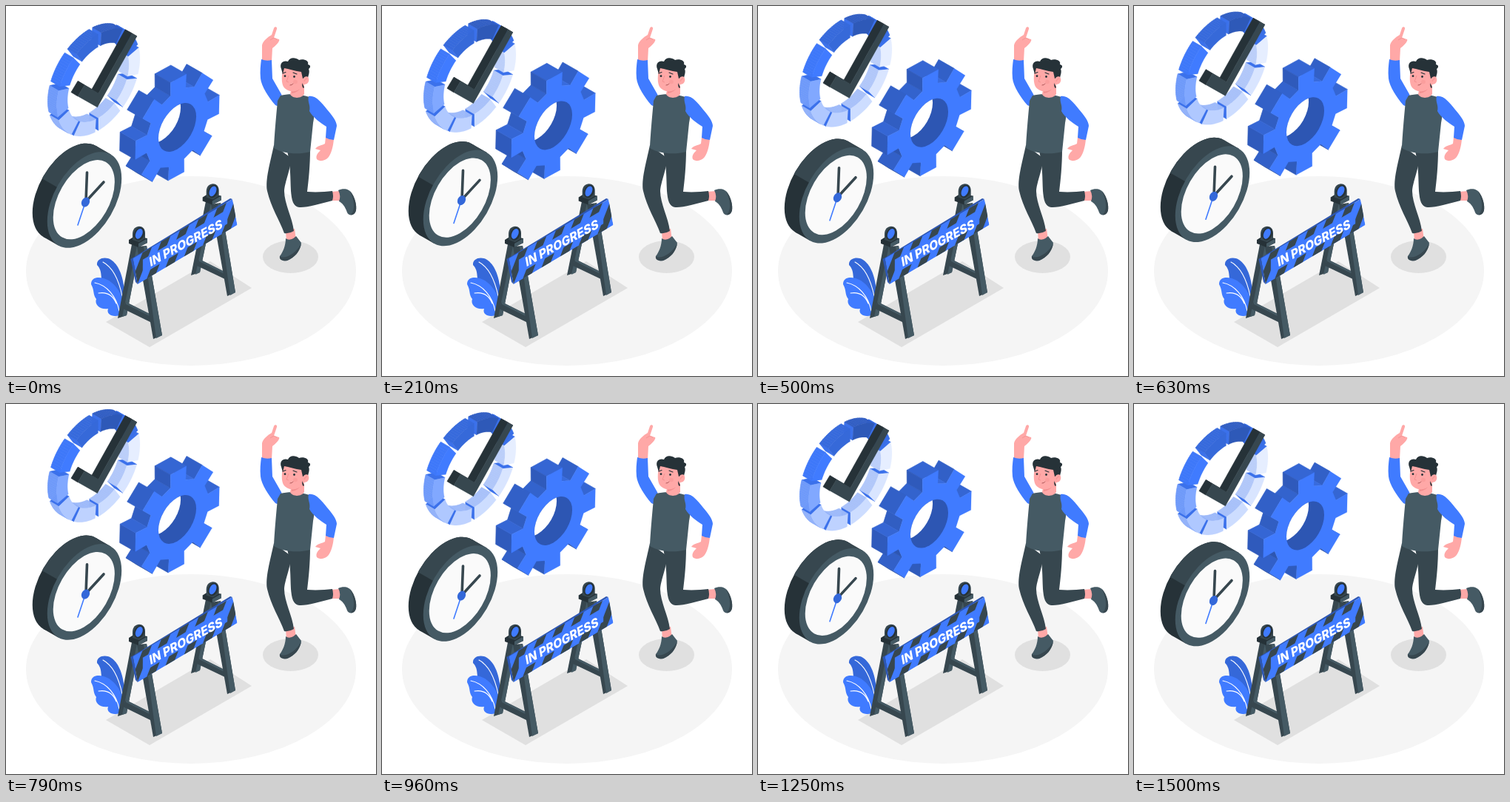
An HTML page for the animation above (1540 ms loop, 500 px wide and 500 px high).

```html
<!DOCTYPE html>
<html lang="en">
<head>
<meta charset="utf-8">
<title>In progress</title>
<style>
  html, body { margin: 0; width: 100%; height: 100%; overflow: hidden; background: #fff; }
  svg { display: block; width: 100vw; height: 100vh; }
  text { font: 800 17px Inter, Roboto, sans-serif; fill: #fff; text-anchor: middle; }
</style>
</head>
<body>
<svg viewBox="0 0 500 500">
  <defs>
    <clipPath id="hole"><circle r="29.5" transform="matrix(.866 -.5 0 1 231.5 164)"/></clipPath>
    <clipPath id="lit"><path d="M20 216.6L90 256.9L180 300V150H20Z"/></clipPath>
    <clipPath id="board"><path d="M0 0H160V36H0Z"/></clipPath>
  </defs>

  <ellipse cx="250" cy="358" rx="223" ry="128" fill="#f5f5f5"/>
  <path d="M135 427L276 345L332 381L194 461Z" fill="#e0e0e0"/>
  <ellipse cx="384.5" cy="339" rx="37.5" ry="22" fill="#e0e0e0"/>

  <g id="ring"></g>
  <g id="gear"></g>

  <g id="clock">
    <g id="case"></g>
    <circle r="58" transform="matrix(.866 -.5 0 1 106 262)" fill="#455a64"/>
    <circle r="48" transform="matrix(.866 -.5 0 1 105.3 261.7)" fill="#fafafa"/>
    <g fill="none" stroke-linecap="round">
      <path d="M108 264L109.5 225M109 263L132 238" stroke="#37474f" stroke-width="3.6"/>
      <path d="M107 266L97 296" stroke="#407bff" stroke-width="1.6"/>
    </g>
    <ellipse cx="107.5" cy="265" rx="5.3" ry="6.8" transform="rotate(28 107.5 265)" fill="#3468d9"/>
  </g>

  <!-- plant -->
  <path d="M123 350C122 341 134 338 142 343C151 349 158 362 160 385L154 400C147 386 140 378 131 373C127 368 131 358 123 350Z" fill="#3568d9"/>
  <path d="M115 376C115 366 125 366 132 368C146 372 156 387 160 402L153 418C145 421 135 417 138 409C128 411 119 404 122 396C117 390 120 385 115 376Z" fill="#407bff"/>
  <path d="M131 346C144 353 152 368 157 392M120 374C136 377 149 392 153 412M125 388C137 386 145 392 149 402" fill="none" stroke="#fff" stroke-width="1.1" stroke-linecap="round"/>

  <!-- barrier -->
  <path d="M270 264L281 268L262 360L250 364Z" fill="#37474f"/>
  <path d="M277 266L281 268L262 360L256 363Z" fill="#455a64"/>
  <path d="M261 342L299 361L300 371L258 351Z" fill="#37474f"/>
  <path d="M261 342L299 361V364L261 345Z" fill="#455a64"/>
  <path d="M277 268L290 266L310 387L299 392Z" fill="#37474f"/>
  <path d="M286 268L290 266L310 387L303 391Z" fill="#455a64"/>
  <path d="M170 322L181 325L163 418L151 422Z" fill="#37474f"/>
  <path d="M177 324L181 325L163 418L157 420Z" fill="#455a64"/>
  <path d="M162 400L200 419L201 430L158 409Z" fill="#37474f"/>
  <path d="M162 400L200 419V422L162 403Z" fill="#455a64"/>
  <path d="M177 325L190 324L211 445L199 450Z" fill="#37474f"/>
  <path d="M186 325L190 324L211 445L203 449Z" fill="#455a64"/>
  <g id="lamp">
    <path d="M166 316L174 311L191 314V320L179 326L166 321Z" fill="#263238"/>
    <path d="M179 321L191 314V320L179 326Z" fill="#455a64"/>
    <path d="M171 316V308C171 295 188 294 188 307V314L180 319Z" fill="#37474f"/>
    <ellipse cx="180" cy="308" rx="6.8" ry="9" transform="rotate(24 180 308)" fill="#263238"/>
    <ellipse cx="179.8" cy="307.8" rx="4.4" ry="7.3" transform="rotate(24 179.8 307.8)" fill="#407bff"/>
  </g>
  <use href="#lamp" x="99.7" y="-57.5"/>
  <path d="M168.5 342L303 260L306 261L172 343L178 376L175 373Z" fill="#2d56b3"/>
  <g transform="matrix(.841 -.5 .18 .972 171.5 341)" clip-path="url(#board)">
    <path d="M0 0H160V36H0Z" fill="#407bff"/>
    <g id="stripes" fill="#37474f"></g>
    <path d="M14 9H150L146 27H10Z" fill="#407bff"/>
  </g>
  <text transform="matrix(.862 -.465 .17 .985 244 326)">IN PROGRESS</text>

  <!-- person -->
  <path d="M346 74V53C347 47 354 42 359 39L362 30C363 27 367 28 366 31L362 43L369 45C371 47 364 54 360 57L359 75Z" fill="#ffa8a7"/>
  <path d="M357 46L362 43L366 45" fill="none" stroke="#f28f8f" stroke-width=".8"/>
  <path d="M345 72Q352 75 359 73L360 98L372 119C377 130 370 138 364 134C355 124 345 108 344 98C343 88 344 80 345 72Z" fill="#407bff"/>
  <path d="M378 303L390 301L392 317L379 319Z" fill="#ffa8a7"/>
  <path d="M439 251L451 250L453 263L440 263Z" fill="#ffa8a7"/>
  <path d="M378 314C383 318 389 314 392 311L399 320C398 331 390 340 380 344C374 345 369 343 370 338C374 333 378 324 378 314Z" fill="#455a64"/>
  <path d="M370 338C376 343 392 335 399 321C397 332 390 340 380 344C374 345 369 343 370 338Z" fill="#37474f"/>
  <path d="M449 249C456 246 464 247 467 253C472 260 474 270 473 276C471 284 463 284 461 279C458 270 454 266 450 264Q453 257 449 249Z" fill="#455a64"/>
  <path d="M465 250C472 258 474 270 473 276C472 281 468 283 466 282C473 275 470 261 465 250Z" fill="#37474f"/>
  <path d="M362 188C357 212 350 235 353 250C358 272 370 290 376 307Q383 308 389 304C387 286 376 267 376 250C377 238 382 228 386 206Z" fill="#37474f"/>
  <path d="M380 196L411 194C411 215 409 235 407 251C420 252 432 251 441 250Q443 257 441 263C425 267 405 273 396 272C388 271 386 262 385 250C384 233 385 217 380 196Z" fill="#37474f"/>
  <path d="M371 121C382 118 399 119 410 123C417 130 418 145 415 158L411 197C395 201 375 200 362 192C363 170 366 140 367 128Z" fill="#455a64"/>
  <path d="M386 108L403 104V119C400 125 387 126 384 119Z" fill="#ffa8a7"/>
  <path d="M386 113Q394 114 399 109Q395 117 386 118Z" fill="#f28f8f"/>
  <path d="M432 177L443 180C442 190 440 198 436 204C432 209 424 211 420 207C418 202 422 198 425 195L418 193C420 189 428 188 431 186Z" fill="#ffa8a7"/>
  <path d="M409 122C418 120 426 130 434 140C441 148 447 156 447 162L443 181Q437 181 432 178L433 163C425 158 414 150 410 142C412 134 407 130 409 122Z" fill="#407bff"/>
  <path d="M375 82C372 94 372 104 375 109C379 115 388 117 394 114C401 111 405 105 406 98L403 79Z" fill="#ffa8a7"/>
  <path d="M372 85C369 77 375 73 381 75C383 69 391 69 396 73C402 71 410 74 408 79C412 80 412 83 409 85C411 90 408 94 408 98L401 98L399 89C391 88 382 85 376 84L374 92Z" fill="#263238"/>
  <ellipse cx="405" cy="100.5" rx="4.2" ry="5.4" transform="rotate(18 405 100.5)" fill="#ffa8a7"/>
  <path d="M403 102Q404 98 407 98M382 94L379 102L382 103" fill="none" stroke="#f28f8f" stroke-width=".9"/>
  <path d="M400 104C402 108 404 110 402 111Q400 110 400 104Z" fill="#263238"/>
  <circle cx="377" cy="94.7" r="1.4" fill="#263238"/>
  <circle cx="389.5" cy="95.5" r="1.4" fill="#263238"/>
  <path d="M374 91L378 89.5M388 90L393 92" stroke="#263238" stroke-width="1.1" stroke-linecap="round"/>
  <path d="M384 107Q387 107 388 105" fill="none" stroke="#a34d50" stroke-width=".9" stroke-linecap="round"/>
  <circle cx="391" cy="102.5" r="2.8" fill="#f28f8f" opacity=".4"/>
</svg>

<script>
const $ = id => document.getElementById(id);
const BLUE = [64, 123, 255], WHITE = [255, 255, 255], BLACK = [0, 0, 0];
const mix = (a, b, t) => a.map((v, i) => v + (b[i] - v) * t);
const css = c => `rgb(${c.map(Math.round)})`;
const rad = d => d * Math.PI / 180;

// Polar point on the isometric wall facing lower right
const iso = (cx, cy) => (r, deg) => {
  const u = r * Math.cos(rad(deg)), v = r * Math.sin(rad(deg));
  return [cx + .866 * u, cy - .5 * u + v];
};
const poly = (pts, fill, line = .2) => {
  const d = pts.map(p => p.map(n => n.toFixed(2)).join(' ')).join('L');
  return `<path d="M${d}Z" fill="${fill}" stroke="${fill}" stroke-width="${line}" stroke-linejoin="round"/>`;
};

// Visible side walls of clockwise shapes pushed back by o, far ones first.
// Light grows from walls facing down left (0) to walls facing up right (1).
function walls(shapes, o, colour) {
  const list = [];
  shapes.forEach((pts, s) => pts.forEach((a, i) => {
    const b = pts[(i + 1) % pts.length], dx = b[0] - a[0], dy = b[1] - a[1];
    if (dy * o[0] - dx * o[1] <= .01) return;
    const back = p => [p[0] + o[0], p[1] + o[1]];
    const light = (Math.atan2(dy, dx) / Math.PI * 180 + 150) / 180;
    list.push({
      key: (a[0] + b[0]) * o[0] + (a[1] + b[1]) * o[1],
      svg: poly([a, b, back(b), back(a)], css(colour(light, s, i, pts.length)), .7)
    });
  }));
  return list.sort((a, b) => a.key - b.key).map(w => w.svg).join('');
}

function drawGear() {
  const at = iso(231.5, 164), pts = [], o = [-21, -12];
  for (let c = 1.5; c < 360; c += 45) {
    pts.push(at(49, c - 14), at(66.5, c - 10.8), at(66.5, c + 10.8), at(49, c + 14));
  }
  $('gear').innerHTML =
    walls([pts], o, light => mix(BLUE, BLACK, .36 - .28 * light)) +
    poly(pts, css(BLUE)) +
    `<g clip-path="url(#hole)"><path d="M190 110H280V220H190Z" fill="${css(mix(BLUE, BLACK, .3))}"/>
     <circle r="29.5" transform="matrix(.866 -.5 0 1 ${231.5 + o[0]} ${164 + o[1]})" fill="#fff"/></g>`;
}

function drawRing() {
  const at = iso(124.7, 103.3), N = 12;
  // below 0 is darker than blue, above 0 is paler
  const tint = [.8, .74, .66, .58, .34, 0, -.15, -.28, -.1, .87];
  const face = tint.map(t => mix(BLUE, t < 0 ? BLACK : WHITE, Math.abs(t)));
  const segs = tint.map((_, k) => {
    const outer = [], inner = [];
    for (let j = 0; j <= N; j++) {
      const a = 22.3 + k * 36 + j * 31.4 / N;
      outer.push(at(65, a));
      inner.unshift(at(48, a));
    }
    return outer.concat(inner);
  });
  const side = (light, s, i, n) => i === N || i === n - 1
    ? mix(BLUE, BLACK, .08)
    : mix(face[s], mix(BLUE, BLACK, .1), .25);
  const check = [[177, 41], [123.5, 137], [97, 122], [106, 107], [125, 118], [170, 37.5]];
  $('ring').innerHTML =
    walls(segs, [-12, -7], side) +
    segs.map((p, k) => poly(p, css(face[k]))).join('') +
    walls([check], [-9, -5.5], () => [38, 50, 56]) +
    poly(check, '#37474f');
}

function drawCase() {
  const back = '<circle r="58" transform="matrix(.866 -.5 0 1 86 250.5)"/>';
  const shape = back + '<path d="M121.5 189L141.5 200.5L70.5 323.5L50.5 312Z"/>';
  $('case').innerHTML =
    `<g fill="#263238">${shape}</g><g fill="#37474f" clip-path="url(#lit)">${shape}</g>`;
}

function drawStripes() {
  let s = '';
  for (let x = -14.5; x < 200; x += 30) s += `<path d="M${x} 0h15l-31 36h-15Z"/>`;
  $('stripes').innerHTML = s;
}

drawGear();
drawRing();
drawCase();
drawStripes();

// Straight up-and-down float, 24 steps a second
const LOOP = 1540, TOP = 720, RISE = 19.2, START = 17.95;
const start = performance.now();
function frame(now) {
  const t = Math.max(0, now - start) % LOOP;
  const step = Math.floor((t + 3) * .024) % 37 / .024;
  let gap = Math.abs(step - TOP);
  gap = Math.min(gap, LOOP - gap);
  const y = gap / (LOOP / 2) * RISE - START;
  const move = (id, dy) => $(id).setAttribute('transform', `translate(0 ${dy.toFixed(3)})`);
  move('ring', y);
  move('gear', y / 2);
  move('clock', y / 2);
  requestAnimationFrame(frame);
}
frame(start);
</script>
</body>
</html>
```
